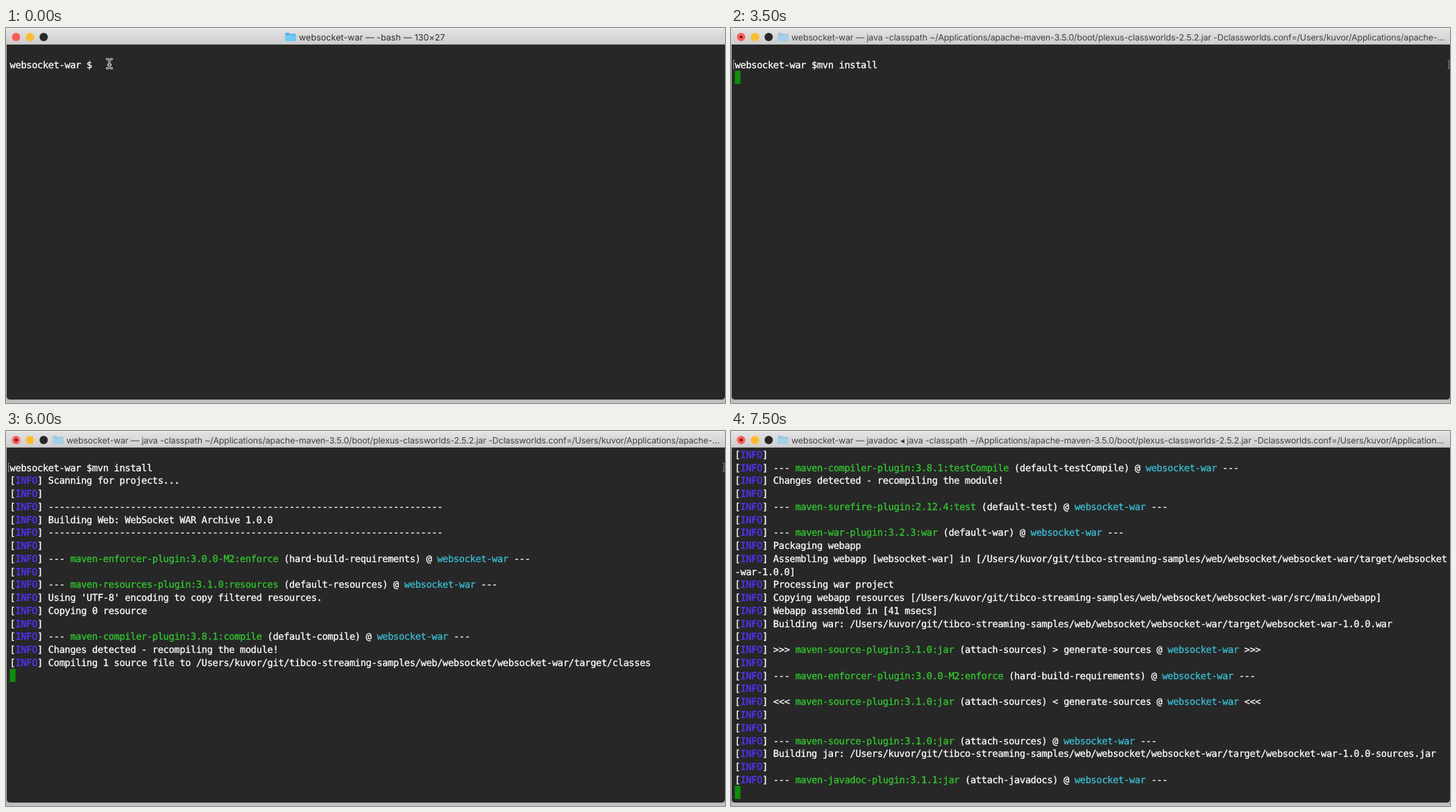
An HTML page that plays this animation: 1036x541 px, repeating every 8 s.

```html
<!DOCTYPE html>
<html lang="en">
<head>
<meta charset="utf-8">
<title>Terminal build</title>
<style>
  html, body { margin: 0; width: 100%; height: 100%; overflow: hidden; background: #bdbdbd; }
  svg { display: block; }
  text { white-space: pre; text-rendering: geometricPrecision; }
  .mono { font: 13.7px "DejaVu Sans Mono", monospace; letter-spacing: -0.349px; font-variant-ligatures: none; stroke-width: 0.3px; }
  .title { font-family: Inter, "DejaVu Sans", sans-serif; }
</style>
</head>
<body>
<svg width="1036" height="541" viewBox="0 0 1036 541">
  <defs>
    <linearGradient id="bar" x1="0" y1="0" x2="0" y2="1">
      <stop offset="0" stop-color="#e4e4e4"/>
      <stop offset="1" stop-color="#cecece"/>
    </linearGradient>
    <linearGradient id="shade" x1="0" y1="0" x2="0" y2="1">
      <stop offset="0" stop-color="#a6a6a6"/>
      <stop offset="1" stop-color="#c6c6c6"/>
    </linearGradient>
    <path id="beamPath" d="M145.5 44.8Q149 44.8 149 47.5V55.5Q149 58.2 145.5 58.2M152.5 44.8Q149 44.8 149 47.5M149 55.5Q149 58.2 152.5 58.2M147.2 53H150.8"/>
  </defs>
  <rect y="530" width="1036" height="11" fill="url(#shade)"/>
  <path d="M1 23H1036V531Q1036 536 1031 536H6Q1 536 1 531Z" fill="#272727"/>
  <rect width="1036" height="23" fill="url(#bar)"/>
  <rect width="1036" height="1" fill="#f0f0f0"/>
  <rect y="23" width="1036" height="1" fill="#b2b2b2"/>
  <circle cx="14.5" cy="13" r="6" fill="#fc5b57"/>
  <circle cx="34.5" cy="13" r="6" fill="#fdbc2e"/>
  <circle cx="54.3" cy="13" r="6" fill="#272727"/>
  <circle id="busy" cx="14.7" cy="13" r="2.1" fill="#6b0f0c"/>
  <g id="folder">
    <path d="M0 1.2Q0 0 1.2 0H5L6.5 1.5H14Q15.2 1.5 15.2 2.7V10.8Q15.2 12 14 12H1.2Q0 12 0 10.8Z" fill="#4fb2e8"/>
    <path d="M0 3.4H15.2V10.8Q15.2 12 14 12H1.2Q0 12 0 10.8Z" fill="#72caf7"/>
  </g>
  <text id="title" class="title" y="17.6"></text>
  <g id="screen" class="mono"></g>
  <g id="marks" fill="none" stroke="#8c8c8c">
    <path d="M5.5 46.5H3.5V58.5H5.5"/>
    <path d="M1032.5 46.5H1034.5V58.5H1032.5"/>
  </g>
  <rect id="cursor" width="8" height="18.8" fill="#0f8f0a"/>
  <g id="beam" fill="none" stroke-linecap="round">
    <use href="#beamPath" stroke="#fff" stroke-width="2.8"/>
    <use href="#beamPath" stroke="#272727" stroke-width="1.1"/>
  </g>
</svg>
<script>
const LOOP = 8000, COL = 7.899, ROW = 18.76, LEFT = 5.6, TOP = 24.4, VISIBLE = 26;
const COLORS = { info: "#5433ff", plugin: "#33c72f", module: "#3bbcd2", plain: "#fff" };
const $ = id => document.getElementById(id);

const home = "/Users/kuvor";
const repo = home + "/git/tibco-streaming-samples/web/websocket/websocket-war";
const rule = "-".repeat(72);
const goal = (plugin, run, mark = "---", phase = "") =>
  ({ plugin: `maven-${plugin}`, run: ` (${run})${phase} @ `, mark });
const enforce = goal("enforcer-plugin:3.0.0-M2:enforce", "hard-build-requirements");
const sources = (mark, phase) => goal("source-plugin:3.1.0:jar", "attach-sources", mark, phase);
const encoding = "Using 'UTF-8' encoding to copy filtered resources.";
const changes = "Changes detected - recompiling the module!";

const log = [
  "Scanning for projects...",
  "", rule, "Building Web: WebSocket WAR Archive 1.0.0", rule,
  "", enforce,
  "", goal("resources-plugin:3.1.0:resources", "default-resources"),
  encoding, "Copying 0 resource",
  "", goal("compiler-plugin:3.8.1:compile", "default-compile"),
  changes, `Compiling 1 source file to ${repo}/target/classes`,
  "", goal("resources-plugin:3.1.0:testResources", "default-testResources"),
  encoding, `skip non existing resourceDirectory ${repo}/src/test/resources`,
  "", goal("compiler-plugin:3.8.1:testCompile", "default-testCompile"),
  changes,
  "", goal("surefire-plugin:2.12.4:test", "default-test"),
  "", goal("war-plugin:3.2.3:war", "default-war"),
  "Packaging webapp",
  `Assembling webapp [websocket-war] in [${repo}/target/websocket`,
  { wrapped: "-war-1.0.0]" },
  "Processing war project",
  `Copying webapp resources [${repo}/src/main/webapp]`,
  "Webapp assembled in [41 msecs]",
  `Building war: ${repo}/target/websocket-war-1.0.0.war`,
  "", sources(">>>", " > generate-sources"),
  "", enforce,
  "", sources("<<<", " < generate-sources"),
  "", "", sources(),
  `Building jar: ${repo}/target/websocket-war-1.0.0-sources.jar`,
  "", goal("javadoc-plugin:3.1.1:jar", "attach-javadocs")
];

// [start ms, value] pairs, each held until the next one
const typing = [[0, " "], [1000, "mv"], [1500, "mvn"], [2000, "mvn ins"], [2500, "mvn instal"], [3000, "mvn install"]];
const output = [[0, 0], [4500, 1], [5000, 7], [5500, 15], [6500, 26], [7000, 45]];

const java = "java -classpath ~/Applications/apache-maven-3.5.0/boot/plexus-classworlds-2.5.2.jar" +
  ` -Dclassworlds.conf=${home}/Application`;
const idle = { x: 422, size: 12.5, gap: 0.06, color: "#2e2e2e" };
const busy = { x: 87, size: 12.4, gap: -0.105, color: "#424242" };
const titles = [
  [0, { ...idle, text: "websocket-war — -bash — 130×27" }],
  [3500, { ...busy, text: `websocket-war — ${java}s/apache-…` }],
  [7500, { ...busy, text: `websocket-war — javadoc ◂ ${java}…` }]
];

const at = (steps, t) => steps.filter(([start]) => start <= t).pop()[1];

function svg(tag, attrs, text = "") {
  const el = document.createElementNS("http://www.w3.org/2000/svg", tag);
  for (const key in attrs) el.setAttribute(key, attrs[key]);
  el.textContent = text;
  return el;
}

function spans(line) {
  if (line.wrapped) return [["plain", line.wrapped]];
  const head = [["plain", "["], ["info", "INFO"]];
  if (!line.plugin) return [...head, ["plain", "] " + line]];
  return [...head, ["plain", `] ${line.mark} `], ["plugin", line.plugin],
    ["plain", line.run], ["module", "websocket-war"], ["plain", " " + line.mark]];
}

function drawRow(parts, row) {
  const text = svg("text", { x: LEFT, y: TOP + 14.4 + row * ROW });
  for (const [kind, part] of parts) {
    text.append(svg("tspan", { fill: COLORS[kind], stroke: COLORS[kind] }, part));
  }
  $("screen").append(text);
}

function drawTitle({ text, x, size, gap, color }, running) {
  const el = $("title");
  el.textContent = text;
  el.setAttribute("x", x);
  el.setAttribute("fill", color);
  el.style.fontSize = size + "px";
  el.style.letterSpacing = gap + "px";
  $("folder").setAttribute("transform", `translate(${x - 19.5} 7)`);
  $("folder").setAttribute("opacity", running ? 0.48 : 1);
}

const show = (id, on) => $(id).setAttribute("visibility", on ? "visible" : "hidden");

let lastStep = -1;

function draw(t) {
  const step = Math.floor(t / 500);
  if (step === lastStep) return;
  lastStep = step;

  const prompt = "websocket-war $" + at(typing, t);
  const rows = [[], [["plain", prompt]], ...log.slice(0, at(output, t)).map(spans)];
  const first = Math.max(0, rows.length - VISIBLE);
  $("screen").textContent = "";
  rows.slice(first).forEach(drawRow);

  const entered = t >= 3000;
  const running = t >= 3500;
  const col = entered ? 0 : prompt.length;
  const row = entered ? rows.length - first : 1;
  $("cursor").setAttribute("x", LEFT + col * COL);
  $("cursor").setAttribute("y", TOP + row * ROW - 0.2);
  show("cursor", t >= 1000);
  show("beam", t < 1000);
  show("marks", entered && first === 0);
  show("busy", running);
  drawTitle(at(titles, t), running);
}

const begin = performance.now();
function tick() {
  draw((performance.now() - begin) % LOOP);
  requestAnimationFrame(tick);
}
tick();
</script>
</body>
</html>
```
